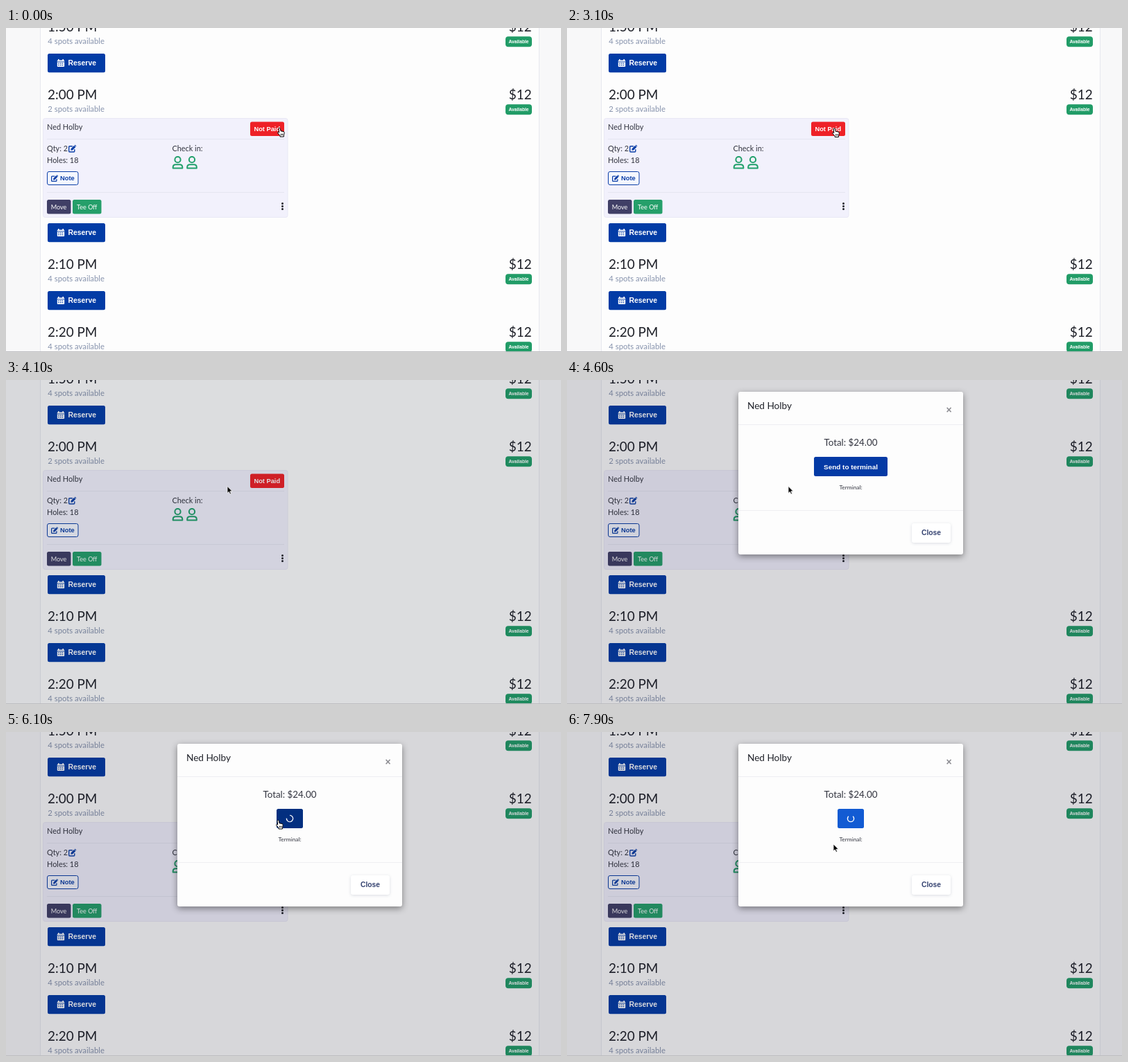
An HTML page that plays this animation: 800x468 px, repeating every 8 s.

```html
<!DOCTYPE html>
<html lang="en">
<head>
<meta charset="utf-8">
<title>Tee sheet payment</title>
<style>
html, body { margin: 0; width: 100%; height: 100%; overflow: hidden; background: #f8f8f9; }
svg { display: block; }
text { font-family: Lato, "Open Sans", sans-serif; fill: #32343f; font-size: 10.9px; white-space: pre; }
.bold { font-family: "Liberation Sans", Arial, sans-serif; font-weight: bold; }
.time { font-size: 18.9px; fill: #1e2028; }
.spots { font-size: 11.3px; fill: #8793ad; }
.white { fill: #fff; }
.mid { text-anchor: middle; }
.end { text-anchor: end; }
.line { stroke: #e5e5f1; }
#modal { filter: drop-shadow(0 3px 5px rgba(0, 0, 0, .42)); }
#close { filter: drop-shadow(0 1px 2px rgba(40, 50, 90, .16)); }
</style>
</head>
<body>
<svg width="800" height="468" viewBox="0 0 800 468">
  <defs>
    <g id="calendar">
      <path fill="#fff" d="M75 45h1.6v1.4h4.8V45H83v1.4h.3q.9 0 .9.9v7.8q0 .9-.9.9h-8.6q-.9 0-.9-.9v-7.8q0-.9.9-.9h.3z"/>
      <path stroke="#023ca6" stroke-width=".9" d="M73.8 48.9h10.4"/>
      <path stroke="#023ca6" stroke-width="1.3" stroke-dasharray="1.5 1.2" d="M75.3 51.1h7.6M75.3 53.7h7.6"/>
    </g>
    <g id="edit" fill="none" stroke="#0a3ea6">
      <path stroke-width="1.4" stroke-linecap="round" d="M5.4 2H1.7Q.7 2 .7 3V9.2Q.7 10.2 1.7 10.2H7.8Q8.8 10.2 8.8 9.2V7"/>
      <path fill="#0a3ea6" stroke="none" d="M8.2.9 10.4 3.1 5.9 7.6 3.4 7.9 3.7 5.4ZM8.7.4Q9.4-.3 10.2.4L10.9 1.1Q11.6 1.9 10.9 2.6Z"/>
    </g>
    <g id="player" fill="none" stroke="#21a06b" stroke-width="2">
      <circle cx="8" cy="5.2" r="4.1"/>
      <path stroke-linejoin="round" d="M1.2 17.4V16.3Q1.2 12.3 5.2 12.3H10.8Q14.8 12.3 14.8 16.3V17.4Z"/>
    </g>
  </defs>

  <rect width="800" height="468" fill="#f8f8f9"/>
  <rect x="49.5" y="-2" width="719" height="472" fill="#fdfdfd" stroke="#e7e8ee"/>
  <g id="rows"></g>

  <rect x="53.5" y="130.5" width="352.5" height="143" rx="3" fill="#f2f1fc" stroke="#e9e8f5"/>
  <path class="line" d="M59 160.5H401M59 237.5H401"/>
  <text x="59" y="147">Ned Holby</text>
  <rect x="352" y="135.5" width="49" height="20.5" rx="2.5" fill="#ee2127"/>
  <text class="bold white mid" x="376.3" y="149.3" style="font-size:9.25px">Not Paid</text>
  <text x="59" y="178">Qty: 2</text>
  <use href="#edit" x="90" y="168.8"/>
  <text x="59" y="195">Holes: 18</text>
  <text x="239.5" y="178">Check in:</text>
  <use href="#player" x="239.5" y="185"/>
  <use href="#player" x="260" y="185"/>
  <rect x="59.5" y="207.5" width="44.5" height="19" rx="2.5" fill="#f4f7ff" stroke="#0a3ea6"/>
  <use href="#edit" transform="translate(65 212.3) scale(.9)"/>
  <text class="bold" x="78" y="220.4" style="font-size:9.3px;fill:#0a3ea6">Note</text>
  <rect x="59" y="248" width="34.5" height="20.5" rx="2.5" fill="#403f66"/>
  <text class="white mid" x="76" y="261.5" style="font-size:9.1px">Move</text>
  <rect x="96" y="248" width="41.5" height="20.5" rx="2.5" fill="#259f6a"/>
  <text class="white mid" x="116.7" y="261.5" style="font-size:9.1px">Tee Off</text>
  <path stroke="#1e2028" stroke-width="3" stroke-linecap="round" d="M398.5 253.5h0M398.5 257.5h0M398.5 261.5h0"/>

  <rect id="shade" width="800" height="468" fill="#141628"/>
  <path stroke="#bdbdc0" d="M0 467.5H800"/>

  <g id="modal">
    <rect x="247" y="17" width="324" height="235" rx="3" fill="#fdfdfd"/>
    <path stroke="#eeeef2" d="M247 64.5H571M247 188.5H571"/>
    <text x="260" y="42" style="font-size:13.6px;fill:#1e2028">Ned Holby</text>
    <text class="bold mid" x="550.5" y="47.5" style="font-size:14px;fill:#8d8d93">×</text>
    <text class="mid" x="409" y="95" style="font-size:13.4px">Total: $24.00</text>
    <rect id="send" y="111" height="28" rx="2.5"/>
    <text id="label" class="bold white mid" x="409" y="128.7" style="font-size:9.95px">Send to terminal</text>
    <circle id="spinner" cx="409" cy="125" r="4.6" fill="none" stroke="#fff" stroke-width="1.4" pathLength="100" stroke-dasharray="76 24" stroke-dashoffset="-12"/>
    <text class="mid" x="409" y="158.3" style="font-size:8.4px">Terminal:</text>
    <rect id="close" x="497" y="207" width="56" height="28" rx="3" fill="#fff"/>
    <text class="bold mid" x="525" y="224.4" style="font-size:10.3px;fill:#344270">Close</text>
  </g>

  <g id="cursor" stroke-linejoin="round">
    <path id="arrow" fill="#000" stroke="#fff" stroke-width=".8" d="M0 0V10L2.3 7.9 3.9 11.5 5.5 10.8 4 7.3H7.2Z"/>
    <path id="hand" fill="#fff" stroke="#000" stroke-width="1" d="M-1 1C-1-.4 1.1-.6 1.4 1L2 4.3 6 5Q7.4 5.4 7.2 7.2L6.4 10.2V12.5H1V11L-2.2 7.4C-3 6-1.4 5.2-.3 6.6ZM2.6 8.2V10.6M4.6 8.2V10.6"/>
  </g>
</svg>
<script>
const LOOP = 8000, STEP = 100;
const el = id => document.getElementById(id);
const clamp = v => Math.max(0, Math.min(1, v));

// time, spots, baseline, distance down to the reserve button
const slots = [
  ["1:50 PM", 4, 5, 32],
  ["2:00 PM", 2, 103, 179],
  ["2:10 PM", 4, 348, 32],
  ["2:20 PM", 4, 446, 32]
];

el("rows").innerHTML = slots.map(([time, spots, y, gap]) => `
  <text class="time" x="60" y="${y}">${time}</text>
  <text class="time end" x="757.7" y="${y}">$12</text>
  <text class="spots" x="60.3" y="${y + 18.2}">${spots} spots available</text>
  <rect x="720" y="${y + 7.3}" width="38" height="15" rx="4" fill="#219c67"/>
  <text class="bold white mid" x="739" y="${y + 17.2}" style="font-size:6.7px">Available</text>
  <rect x="60" y="${y + gap}" width="83" height="27.3" rx="2.5" fill="#023ca6"/>
  <use href="#calendar" y="${y + gap - 37}"/>
  <text class="bold white" x="89.5" y="${y + gap + 17.4}" style="font-size:10.4px">Reserve</text>`).join("");

// time, x, y of the pointer tip
const path = [
  [0, 394, 144.5], [600, 389, 144.5], [3000, 389, 144.5], [3700, 319, 153.5],
  [4900, 319, 153.5], [5400, 392, 127.5], [6400, 392, 127.5], [7000, 384, 162], [LOOP, 384, 162]
];

function pointer(t) {
  const i = path.findIndex(p => p[0] > t);
  const [t0, x0, y0] = path[i - 1], [t1, x1, y1] = path[i];
  const u = (t - t0) / (t1 - t0), k = u * u * (3 - 2 * u);
  return [x0 + (x1 - x0) * k, y0 + (y1 - y0) * k];
}

const inside = (x, y, l, t, r, b) => x >= l && x <= r && y >= t && y <= b;

function draw(t) {
  const [x, y] = pointer(t);
  const open = t > 4100, loading = t >= 5600;
  const left = loading ? 390 : 356, width = loading ? 38 : 106;
  const overSend = open && inside(x, y, left, 111, left + width, 139);
  const hand = overSend || !open && inside(x, y, 352, 135, 401, 156);

  el("shade").setAttribute("opacity", .16 * clamp((t - 3933) / 195));

  const slide = clamp((t - 4100) / 300);
  el("modal").setAttribute("opacity", clamp((t - 4100) / 150));
  el("modal").setAttribute("transform", `translate(0 ${-35 * (1 - slide) ** 2})`);

  const send = el("send");
  send.setAttribute("x", left);
  send.setAttribute("width", width);
  send.setAttribute("fill", overSend ? (loading ? "#032f80" : "#03338f") : loading ? "#125bd3" : "#043aa5");
  el("label").setAttribute("opacity", loading ? 0 : 1);
  el("spinner").setAttribute("opacity", loading ? 1 : 0);
  el("spinner").setAttribute("transform", `rotate(${(t - 7900) / 850 * 360 - 90} 409 125)`);

  el("cursor").setAttribute("transform", `translate(${x} ${y})`);
  el("hand").setAttribute("opacity", hand ? 1 : 0);
  el("arrow").setAttribute("opacity", hand ? 0 : 1);
}

const start = performance.now();
function tick() {
  const t = (performance.now() - start) % LOOP;
  draw(Math.floor(t / STEP) * STEP);
  requestAnimationFrame(tick);
}
tick();
</script>
</body>
</html>
```
